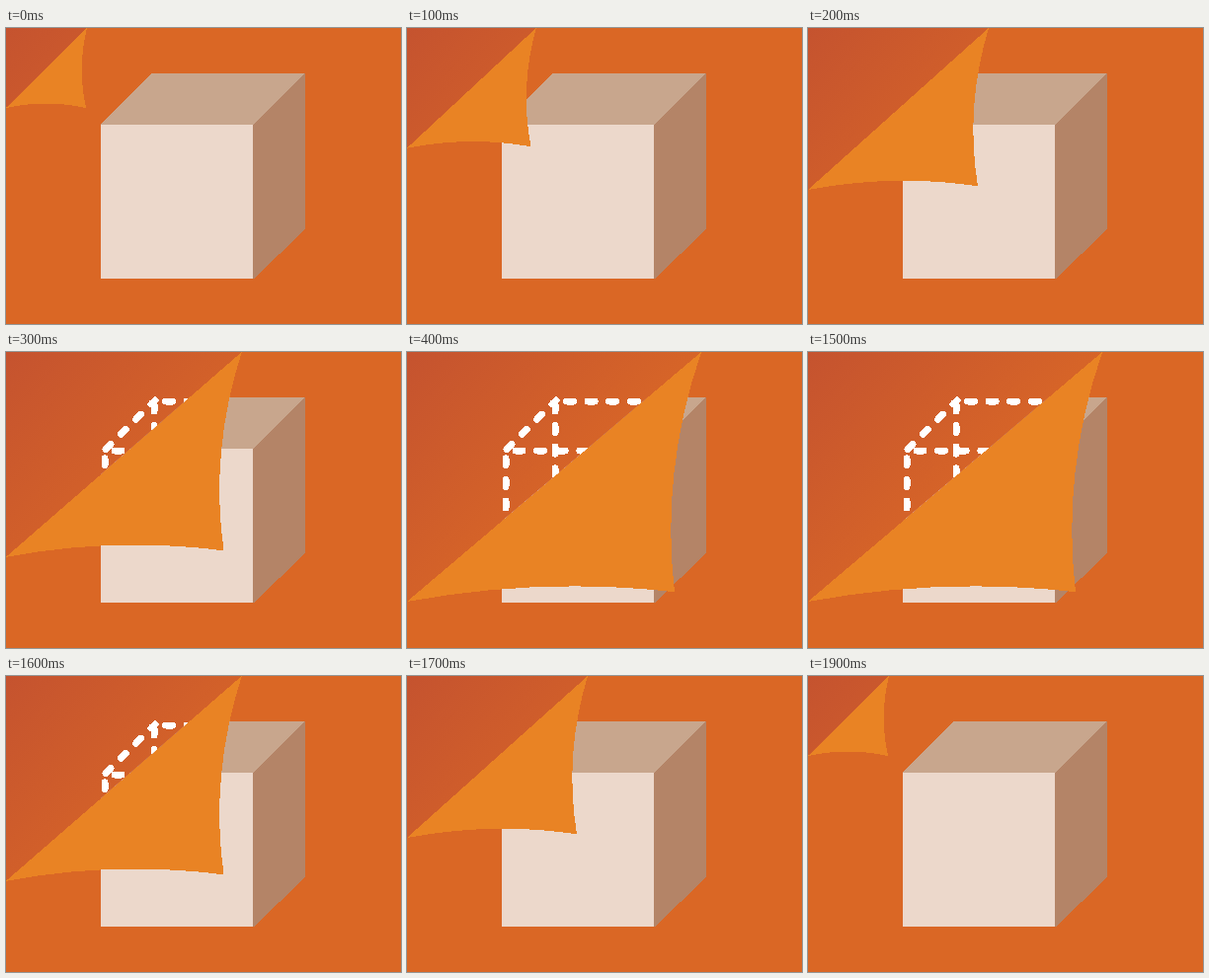
These frames come from a looping animation (400x300 px, 2 s). An HTML page:

```html
<!DOCTYPE html>
<html lang="en">
<head>
<meta charset="utf-8">
<title>Page peel</title>
<style>
html, body { margin: 0; width: 100%; height: 100%; overflow: hidden; background: #da6725; }
svg { display: block; width: 100vw; height: 100vh; shape-rendering: crispEdges; }
.dash { stroke: #fff; stroke-width: 7; stroke-linecap: round; stroke-dasharray: 7 14.6; }
</style>
</head>
<body>
<svg viewBox="0 0 400 300">
  <defs>
    <linearGradient id="under" gradientUnits="userSpaceOnUse" x1="0" y1="0" x2="165" y2="165">
      <stop offset="0" stop-color="#c5532f"/>
      <stop offset="1" stop-color="#d86627"/>
    </linearGradient>
    <clipPath id="peeled"><path id="corner"/></clipPath>
  </defs>
  <rect width="400" height="300" fill="#da6725"/>
  <path d="M96 98L147 46H303L250 98Z" fill="#c8a68d"/>
  <path d="M250 98L303 46V204L251 254H250Z" fill="#b48467"/>
  <path d="M96 98H250V254H96Z" fill="#ecd8cb"/>
  <g clip-path="url(#peeled)">
    <rect width="400" height="300" fill="url(#under)"/>
    <g class="dash">
      <path d="M161.5 50H310"/>
      <path d="M110 100H260"/>
      <path d="M100 107.8V250"/>
      <path d="M150 53V200"/>
      <path d="M101 98.5L151 49"/>
      <path d="M300 50L250 100" stroke-dashoffset="3.5"/>
    </g>
  </g>
  <path id="flap" fill="#e98324"/>
</svg>
<script>
const STEP = 100, LOOP = 2000, LAST = 5;
const corner = document.getElementById('corner');
const flap = document.getElementById('flap');
const start = performance.now();

// k counts peel steps; every point speeds up slightly as the page turns
function peel(k) {
  const at = (from, speed, gain) => from + speed * k + gain * k * k;
  const top = at(82, 47, 1.75);
  const left = at(81, 40, 0.75);
  const x = at(81, 43.5, 1);
  const y = at(81, 38.75, 0.45);
  const pullX = (top + x) / 2 - at(9.5, 4.6, 0);
  const pullY = (left + y) / 2 - at(9, 2.8, 0);
  corner.setAttribute('d', `M0 0H${top}L0 ${left}Z`);
  flap.setAttribute('d',
    `M${top} 0Q${pullX} ${y / 2} ${x} ${y}Q${x / 2} ${pullY} 0 ${left}Z`);
}

function tick(now) {
  const step = Math.floor((Math.max(0, now - start) % LOOP) / STEP);
  peel(Math.min(step, LAST, LOOP / STEP - 1 - step));
  requestAnimationFrame(tick);
}
tick(start);
</script>
</body>
</html>
```
